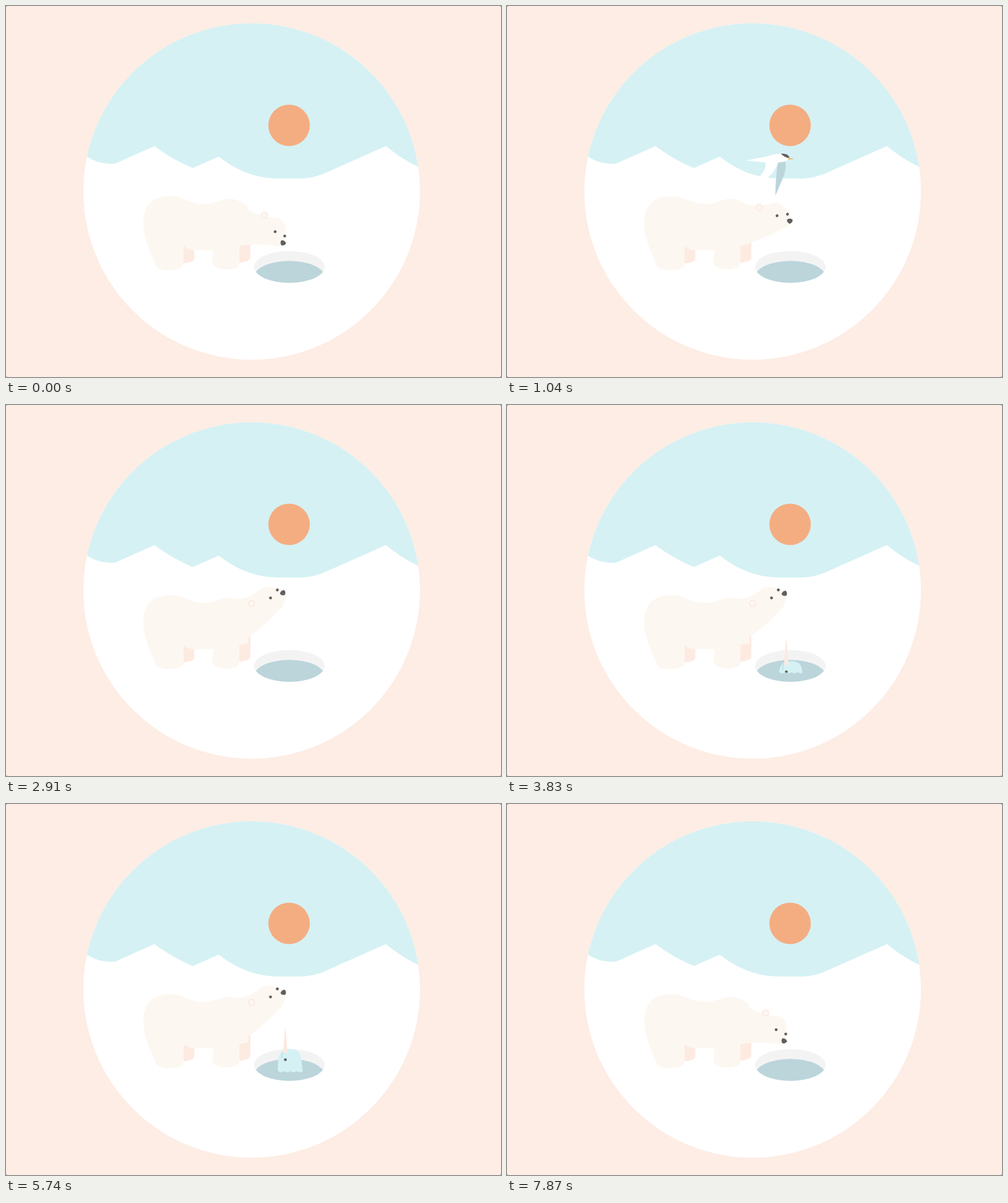
An HTML page for the animation above (8 s loop, 800x600 px).

```html
<!DOCTYPE html>
<html lang="en">
<head>
<meta charset="utf-8">
<title>Polar bear</title>
<style>
  html, body { margin: 0; height: 100%; overflow: hidden; background: #777; }
  svg { display: block; width: 800px; height: 600px; }
  .pink { fill: #fdebe2; }
  .fur { fill: #fdf7f1; }
  .dark { fill: #5f5f5f; }
  .ice { fill: #d5f1f4; }
  .water { fill: #bbd5db; }
</style>
</head>
<body>
<svg viewBox="0 0 800 600">
  <defs>
    <clipPath id="disc"><circle cx="397" cy="300" r="272"/></clipPath>
    <clipPath id="hole"><ellipse cx="458" cy="422" rx="57" ry="25.7"/></clipPath>
    <clipPath id="surface"><path d="M430 340H490V432H480q-5 4-10 0q-5 4-10 0q-5 4-10 0q-5 4-10 0H430Z"/></clipPath>
  </defs>

  <rect width="800" height="600" rx="2.5" fill="#fdede4"/>
  <circle cx="397" cy="300" r="272" fill="#fff"/>
  <path class="ice" clip-path="url(#disc)" d="M100 0V225L130 243Q150 257 176 255L240 226.500Q268 248 302 262L344 243.500Q388 279 440 279H478Q498 278 515 270.500L614 226.500Q640 248 668 261L700 270V0Z"/>
  <circle cx="457.5" cy="193" r="33.500" fill="#f4ad81"/>

  <ellipse cx="458" cy="422" rx="57" ry="25.700" fill="#f4f3f4"/>
  <ellipse class="water" cx="458" cy="438" rx="57" ry="25.700" clip-path="url(#hole)"/>

  <g clip-path="url(#surface)">
    <g id="narwhal">
      <path class="ice" d="M439.500 470V418Q440 397 456 396.500Q474 395 476.500 408L480 434V470Z"/>
      <path d="M447.500 402L451 362.500h1L455 402Q451 404 447.500 402Z" fill="#fbe9e2"/>
      <path d="M447 401Q444.500 405 446 411" fill="none" stroke="#a9d0d8"/>
      <circle class="dark" cx="451.500" cy="413.500" r="2.300"/>
    </g>
  </g>

  <path class="pink" d="M286 380H304.500V408Q304 415 287 416ZM376 365H395V407Q394 414 376 415Z"/>
  <path class="fur" d="M222 350C222 318 242 307 268 307.500C288 308 298 321 322 320C342 319 344 312 361 312C374 312 380 317 390 323L392 385L377 388V417Q377 425 358 426Q334 426 334 414L335 395H304Q293 394 287 388V417Q286 427 262 427Q246 427 242 420C235 400 222 380 222 350Z"/>
  <path id="neck" class="fur"/>
  <g id="head">
    <path class="fur" d="M-22-14C-10-25 3-22 6-21Q16-17 17-3Q18 8 17 18C15 24 8 24 1 23L-10 22L-24 12Z"/>
    <circle cx="-17" cy="-27" r="4.800" class="fur" stroke="#fbe9e1" stroke-width="1.800"/>
    <circle class="dark" r="2.300"/>
    <circle class="dark" cx="15.500" cy="7" r="2.300"/>
    <path id="nose" class="dark" d="M-4.500-2.500Q0-6 4.500-2.500Q5 2 0 4.300Q-5 2-4.500-2.500Z"/>
  </g>

  <g clip-path="url(#disc)">
    <g id="bird">
      <path id="farWing" class="water" d="M12-1H24Q27 10 19 28L8 54Q8 30 12-1Z"/>
      <path d="M-40-3L-5-10Q12-15 20-14Q30-12 31-7Q28-1 13 0H-8Z" fill="#fff"/>
      <path class="dark" d="M17-14Q28-15 31-8L29-7Q22-9 17-14Z"/>
      <path d="M29-8L39-6L29-4Z" fill="#e8c07a"/>
      <path id="nearWing" fill="#fff" d="M-8-1Q-5 14-27 31Q1 32 13-1Z"/>
    </g>
  </g>
</svg>
<script>
const LOOP = 8000;
const part = id => document.getElementById(id);
const set = (id, name, value) => part(id).setAttribute(name, value);

// Quadratic ease in and out between two times.
function ease(t, from, to) {
  const u = Math.min(1, Math.max(0, (t - from) / (to - from)));
  return u < .5 ? 2 * u * u : 1 - 2 * (1 - u) ** 2;
}

// Repeated small pull of the nose, 0 to 1.
const sniff = (t, from, to) =>
  t < from || t > to ? 0 : (1 - Math.cos((t - from) * Math.PI / 160)) / 2;

function drawBear(t) {
  const p = ease(t, 660, 1470) - ease(t, 6370, 7610);
  const x = 435 + 12.1 * p - 19.6 * p * p;
  const y = 365 - 62.6 * p + 9.6 * p * p;
  const angle = -74 * p, rad = angle * Math.PI / 180;
  const onHead = (a, b) =>
    `${x + a * Math.cos(rad) - b * Math.sin(rad)} ${y + a * Math.sin(rad) + b * Math.cos(rad)}`;

  set("head", "transform", `translate(${x} ${y}) rotate(${angle})`);
  set("neck", "d", `M362 312Q370 ${312 + p} 375 ${316 - 2.5 * p}` +
    `Q${398 - 6 * p} ${340 - 26 * p} ${onHead(8, -20)}L${onHead(-7, 22)}` +
    `Q${403 + 17 * p} ${384 - 26 * p * p} 377 ${388 - 2 * p}Z`);

  const pull = sniff(t, 2430, 3070) + sniff(t, 4330, 5610);
  set("nose", "transform", `translate(${12.5 + .7 * pull} ${18.5 - 1.2 * pull}) rotate(33)`);
}

function drawNarwhal(t) {
  const up = ease(t, 3000, 4250) - ease(t, 6800, 7350);
  set("narwhal", "transform", `translate(0 ${80 * (1 - up)})`);
}

function drawBird(t) {
  const d = t - 1040;
  const flap = Math.cos(d * Math.PI / 200);
  set("bird", "visibility", Math.abs(d) < 600 ? "visible" : "hidden");
  set("bird", "transform",
    `translate(${425 + .68 * d} ${253 - .00042 * d * d}) rotate(${-.04 * d})`);
  for (const wing of ["farWing", "nearWing"]) set(wing, "transform", `scale(1 ${flap})`);
}

function frame(now) {
  const t = now % LOOP;
  drawBear(t);
  drawNarwhal(t);
  drawBird(t);
  requestAnimationFrame(frame);
}
frame(performance.now());
</script>
</body>
</html>
```
